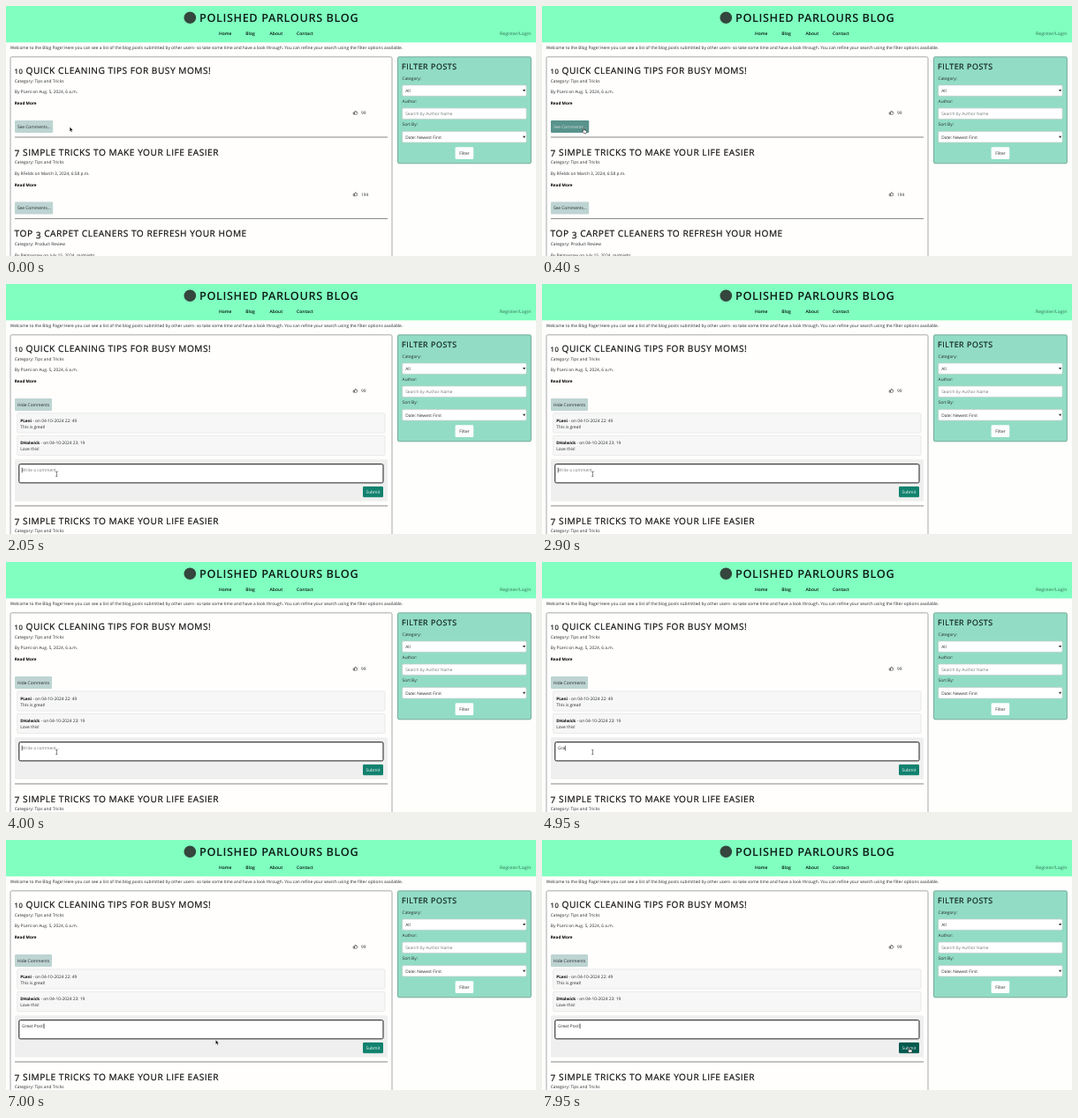
An HTML page that plays this animation: 600x284 px, repeating every 8000 ms.

```html
<!DOCTYPE html>
<html lang="en">
<head>
<meta charset="utf-8">
<title>Blog comments</title>
<style>
  html, body { margin: 0; width: 100%; height: 100%; overflow: hidden; background: #fefefc; }
  svg { display: block; width: 100vw; height: 100vh; }
  text { font: 4.83px "Open Sans", "Noto Sans", sans-serif; fill: #26292c; white-space: pre; text-rendering: geometricPrecision; }
  .bold { font-size: 4.65px; font-weight: 700; fill: #000; }
  .site { font-size: 12.7px; font-weight: 600; letter-spacing: .6px; fill: #0c1a14; }
  .nav { font-size: 5px; font-weight: 600; fill: #06150e; }
  .login { font-size: 5px; letter-spacing: .15px; fill: #2d634b; }
  .title { font-size: 10.1px; letter-spacing: .54px; fill: #111; stroke: #111; stroke-width: .2; }
  .small { font-size: 7.6px; }
  .panel { font-size: 8.83px; letter-spacing: .58px; fill: #0d1d18; stroke: #0d1d18; stroke-width: .2; }
  .hint { fill: #73787c; }
  .mid { text-anchor: middle; }
  .line { stroke: #77797a; stroke-width: .9; }
  .icon { fill: none; stroke: #222; stroke-width: .6; stroke-linejoin: round; stroke-linecap: round; }
</style>
</head>
<body>
<svg id="stage" viewBox="0 0 600 284" preserveAspectRatio="none"></svg>
<script>
const LOOP = 8000;
const OPEN = 800, FOCUS = 1650, TYPE_START = 4710, TYPE_STEP = 110, BLINK = 530;
const MESSAGE = "Great Post!";
const TYPE_END = TYPE_START + TYPE_STEP * (MESSAGE.length - 1);
const SHIFT = 103;

const text = (x, y, str, cls = "", extra = "") =>
  `<text x="${x}" y="${y}" class="${cls}" ${extra}>${str}</text>`;
const box = (x, y, w, h, fill, stroke = "none", r = 1.3, extra = "") =>
  `<rect x="${x}" y="${y}" width="${w}" height="${h}" rx="${r}" fill="${fill}" stroke="${stroke}" stroke-width=".7" ${extra}/>`;

// Old-style figures: 0 to 2 are small, 3 and 7 hang below the baseline
const oldStyle = str => str
  .replace(/[0-2]+/, n => `<tspan class="small">${n}</tspan>`)
  .replace(/([37])( .*)/, `<tspan dy="1.6">$1</tspan><tspan dy="-1.6">$2</tspan>`);

const thumb = y => `<path class="icon" transform="translate(393.3 ${y}) scale(.92)"
  d="M.3 2.2h1v2.5h-1zM1.3 2.3L2.5 .3c.8-.1.8.7.5 1.6h1.6c.5 0 .5.6.2.8.3.3.2.7-.1.8.1.4-.1.6-.3.7 0 .4-.3.5-.6.5H2.3l-1-.4"/>`;

const postHead = (title, category, byline, likes) =>
  text(9.6, 77, /^\d+ /.test(title) || /\d/.test(title) ? oldStyle(title) : title, "title") +
  text(9.8, 86.7, "Category: " + category) +
  text(9.8, 99.4, "By " + byline) +
  text(9.8, 112.2, "Read More", "bold") +
  thumb(118.8) + text(402, 123.1, likes);

const divider = `<path class="line" d="M10 149H432"/>`;
const post = (y, ...details) => `<g transform="translate(0 ${y})">${postHead(...details)}${divider}</g>`;

const seeButton = (y, id = "") => `<g transform="translate(0 ${y})" ${id && `id="${id}"`}>
  ${box(10, 130, 43.2, 14, "#bdd4d2")}${text(12.9, 138.9, "See Comments...")}</g>`;

const comment = (y, name, when, body) =>
  box(12.7, y, 416.3, 22.3, "#f6f7f6", "#e2e3e2") +
  text(16.3, y + 9.7, `<tspan class="bold">${name}</tspan> - on ${when}`) +
  text(16.3, y + 17, body);

const field = (y, str, cls, arrow) =>
  box(448.7, y, 140.4, 12.4, "#fff", "#c3cdc9") + text(452.2, y + 7.9, str, cls) +
  (arrow ? `<path d="M585 ${y + 5.2}h3.2l-1.6 2.2z" fill="#222"/>` : "");

stage.innerHTML = `
  <rect width="600" height="284" fill="#fefefc"/>
  <rect width="600" height="41.3" fill="#80ffc0"/>
  <circle cx="208.3" cy="13.3" r="6.8" fill="#34463d"/>
  ${text(219, 17.8, "POLISHED PARLOURS BLOG", "site")}
  ${text(240.9, 32.7, "Home", "nav")}${text(271.3, 32.7, "Blog", "nav")}
  ${text(298.5, 32.7, "About", "nav")}${text(329, 32.7, "Contact", "nav")}
  ${text(559, 32.7, "Register/Login", "login")}
  ${text(4.8, 49.4, "Welcome to the Blog Page! Here you can see a list of the blog posts submitted by other users- so take some time and have a look through. You can refine your search using the filter options available.")}
  ${box(5, 57.8, 432, 240, "#fffefd", "#828685", 1.6)}

  ${box(443.5, 57.8, 150.9, 121, "#92dcc5", "#558f7c", 1.6)}
  ${text(448, 71.5, "FILTER POSTS", "panel")}
  ${text(448.6, 83.5, "Category:")}${field(89.9, "All", "", true)}
  ${text(448.6, 109.5, "Author:")}${field(116, "Search by Author Name", "hint")}
  ${text(448.6, 136, "Sort By:")}${field(142.6, "Date: Newest First", "", true)}
  ${box(508.6, 160.2, 20.6, 13.8, "#fdfefe")}${text(519, 168.9, "Filter", "mid")}

  ${postHead("10 QUICK CLEANING TIPS FOR BUSY MOMS!", "Tips and Tricks", "PLeni on Aug. 5, 2024, 6 a.m.", "99")}
  ${seeButton(0, "toggle")}
  <g id="thread">
    ${comment(146.8, "PLeni", "04-10-2024 22: 49", "This is great!")}
    ${comment(172.3, "DHalwick", "04-10-2024 23: 19", "Love this!")}
    ${box(10, 199.2, 422, 47.6, "#eeefee", "none", .8)}
    ${box(14.8, 204.6, 412.2, 21.3, "#fff", "#c9cbcb", 1.5, 'id="area"')}
    ${text(18, 213.4, "", "", 'id="entry"')}
    <path id="caret" d="M0 208.6v5.8" stroke="#000" stroke-width=".6"/>
    <g id="submit">${box(404, 229.9, 23, 12.3, "#12826f")}${text(415.5, 237.8, "Submit", "mid", 'style="fill:#fff"')}</g>
  </g>
  <g id="below">
    ${divider}
    ${post(92.6, "7 SIMPLE TRICKS TO MAKE YOUR LIFE EASIER", "Tips and Tricks", "RFelds on March 3, 2024, 6:58 p.m.", "194")}
    ${seeButton(92.6)}
    ${post(185.4, "TOP 3 CARPET CLEANERS TO REFRESH YOUR HOME", "Product Review", "Pelmarrow on July 15, 2024, midnight", "87")}
  </g>
  <g id="cursor" stroke-linejoin="round">
    <path id="arrow" d="M0 0v4.8l1.1-1 .8 1.8.9-.4-.8-1.7h1.5z" fill="#000" stroke="#fff" stroke-width=".3"/>
    <path id="hand" d="M-.7-2.6q.6-.7 1.1 0v2l2.2.5q.6.2.5.8L2.6 3H-.3L-2 .9q0-.8.7-.6l.6.5z" fill="#fff" stroke="#111" stroke-width=".55"/>
    <path id="beam" d="M-1-2.7q1 0 1 .5v4.4q0 .5-1 .5M1-2.7q-1 0-1 .5M1 2.7q-1 0-1-.5" fill="none" stroke="#222" stroke-width=".6"/>
  </g>`;

const $ = id => document.getElementById(id);
const show = (id, on) => $(id).setAttribute("visibility", on ? "visible" : "hidden");
const ramp = (t, from, to) => {
  const p = Math.min(1, Math.max(0, (t - from) / (to - from)));
  return p * p * (3 - 2 * p);
};
const mix = (a, b, p) => `rgb(${a.map((v, i) => Math.round(v + (b[i] - v) * p))})`;

// [start, end, x, y]: the pointer glides to (x, y) between the two times
const moves = [[80, 390, 47.5, 141.5], [650, 800, 46.5, 141.5], [1200, 1590, 57.3, 216], [6650, 7350, 416, 238.5]];

function pointerAt(t) {
  let x = 72.2, y = 137.6;
  for (const [from, to, toX, toY] of moves) {
    const p = ramp(t, from, to);
    x += (toX - x) * p;
    y += (toY - y) * p;
  }
  return [x, y];
}

function drawPointer(t, opened) {
  const [x, y] = pointerAt(t);
  const inside = (l, top, r, b) => x > l && x < r && y > top && y < b;
  const onButton = inside(10, 130, 53, 144) || opened && inside(404, 229, 427, 243);
  const onArea = opened && inside(14, 204, 427, 226);
  $("cursor").setAttribute("transform", `translate(${x} ${y})`);
  show("hand", onButton);
  show("beam", onArea);
  show("arrow", !onButton && !onArea);
}

function drawToggle(t, opened) {
  const hover = ramp(t, 320, 475) - ramp(t, 1260, 1410);
  const [rect, label] = $("toggle").children;
  rect.setAttribute("width", opened ? 42 : 43.2);
  rect.setAttribute("fill", mix([189, 212, 210], [0, 90, 78], hover));
  label.textContent = opened ? "Hide Comments" : "See Comments...";
  label.style.fill = mix([38, 41, 44], [255, 255, 255], Math.min(1, hover * 1.6));
}

function drawEntry(t) {
  const focused = t >= FOCUS;
  const count = t < TYPE_START ? 0 : Math.min(MESSAGE.length, 1 + Math.floor((t - TYPE_START) / TYPE_STEP));
  const entry = $("entry");
  entry.textContent = count ? MESSAGE.slice(0, count) : "Write a comment...";
  entry.setAttribute("class", count ? "" : "hint");
  $("area").setAttribute("stroke", focused ? "#1c1c1c" : "#c9cbcb");
  $("area").setAttribute("stroke-width", focused ? 1 : .7);

  const typing = count > 0 && t < TYPE_END;
  const since = t - (count ? TYPE_END : FOCUS);
  const caretX = 18.2 + (count ? entry.getComputedTextLength() : 0);
  $("caret").setAttribute("transform", `translate(${caretX} 0)`);
  show("caret", focused && (typing || since % (2 * BLINK) < BLINK));
  $("submit").firstElementChild.setAttribute("fill", mix([18, 130, 111], [4, 90, 78], ramp(t, 7240, 7390)));
}

function render() {
  const t = performance.now() % LOOP;
  const opened = t >= OPEN;
  $("thread").style.display = opened ? "" : "none";
  $("below").setAttribute("transform", `translate(0 ${opened ? SHIFT : 0})`);
  drawToggle(t, opened);
  if (opened) drawEntry(t);
  else show("caret", false);
  drawPointer(t, opened);
  requestAnimationFrame(render);
}
render();
</script>
</body>
</html>
```
